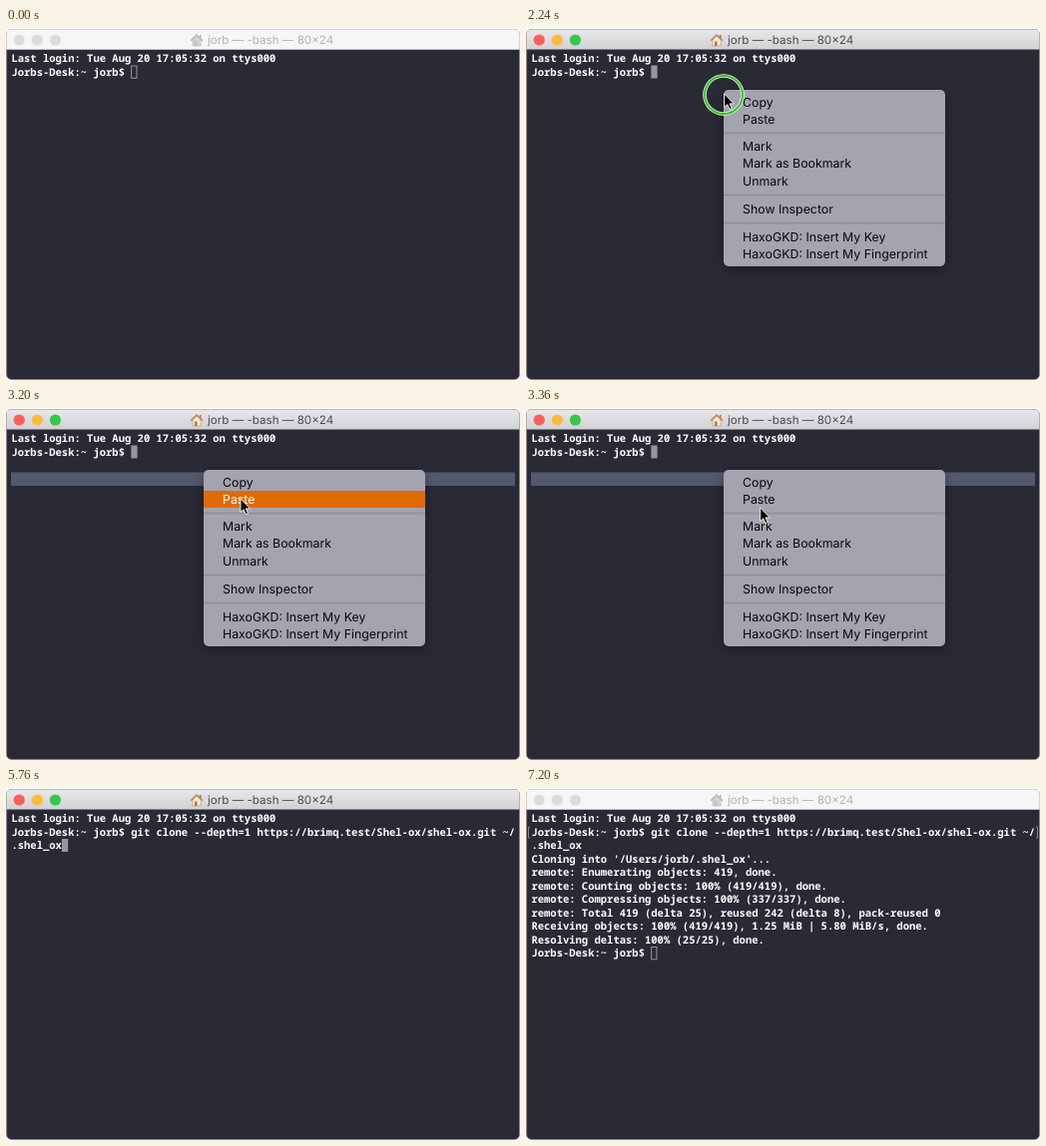
Write an HTML page that moves like this. It is 515 px wide and 353 px high and loops after 8000 ms.

```html
<!DOCTYPE html>
<html lang="en">
<head>
<meta charset="utf-8">
<title>Terminal</title>
<style>
html, body { margin: 0; width: 100%; height: 100%; overflow: hidden; background: #fff; }
svg { display: block; width: 515px; height: 353px; }
text { text-rendering: geometricPrecision; white-space: pre; }
#term text { font: 600 10.52px "Noto Sans Mono", "DejaVu Sans Mono", monospace; fill: #fff; }
.bar text { font: 11.6px Inter, "Liberation Sans", sans-serif; }
#menu text { font: 12.35px Inter, "Liberation Sans", sans-serif; fill: #08080c; }
#menu text.hot { fill: #fff; }
#menu { filter: drop-shadow(0 4px 6px rgba(0, 0, 0, .35)); }
</style>
</head>
<body>
<svg viewBox="0 0 515 353">
  <defs>
    <linearGradient id="metal" x2="0" y2="1">
      <stop stop-color="#e8e7e9"/><stop offset="1" stop-color="#d1d0d2"/>
    </linearGradient>
    <path id="caret" d="M-3-6.5H-2Q0-6.5 0-5V5Q0 6.5-2 6.5H-3M3-6.5H2Q0-6.5 0-5M3 6.5H2Q0 6.5 0 5M-1.5 2H1.5"/>
  </defs>
  <rect x=".5" y="1.5" width="514" height="351" rx="5" fill="#2a2936" stroke="#85858b" stroke-width=".8"/>
  <g id="on" class="bar"></g>
  <g id="off" class="bar"></g>
  <rect id="row" x="5" y="64.5" width="505" height="13.5" fill="#54596d"/>
  <g id="term"></g>
  <path id="marks" d="M4 39H2.5V50H4M511 39H512.5V50H511" fill="none" stroke="#85858d"/>
  <rect id="block" width="6.3" height="13" fill="#96969c"/>
  <rect id="hollow" width="5.3" height="12.3" fill="none" stroke="#96969c"/>
  <g id="menu"></g>
  <g id="ring" fill="none">
    <circle cx="198" cy="67" r="19" stroke="#e4f5e0" stroke-width="3.6"/>
    <circle cx="198" cy="67" r="19" stroke="#3cbf2c" stroke-width="2"/>
  </g>
  <path id="arrow" d="M0 0V13.5L3.1 10.8L5.3 15.6L7.5 14.6L5.3 9.9H9.6Z" fill="#000" stroke="#fff" stroke-width=".9"/>
  <g id="beam" fill="none" stroke-linecap="square">
    <use href="#caret" stroke="#fff" stroke-width="2.8"/>
    <use href="#caret" stroke="#16161c"/>
  </g>
</svg>
<script>
const $ = id => document.getElementById(id);
const show = (id, on) => $(id).style.display = on ? '' : 'none';
const LOOP = 8000, STEP = 80, CELL = 6.312, LINE = 13.5, LEFT = 5.4, TOP = 24;

// Title bar, in colour or greyed out
function bar(active) {
  const lights = ['#fc5f59', '#fdbb3c', '#33c748'].map((c, i) =>
    `<circle cx="${13.2 + i * 18.1}" cy="12" r="5.6" fill="${active ? c : '#dcdcdd'}"/>`).join('');
  const [roof, wall, door, ink] = active
    ? ['#b98a63', '#f4ead2', '#a8794f', '#4b4b4d']
    : ['#b9b9b9', '#d2d2d2', '#bdbdbd', '#b2b2b4'];
  return `<path d="M.5 21.5V7Q.5 1.5 6 1.5H509Q514.5 1.5 514.5 7V21.5Z" fill="${active ? 'url(#metal)' : '#f6f6f6'}"/>
    ${lights}
    <path d="M193.8 7H195.6V11H193.8Z" fill="${door}"/>
    <path d="M187 12L191 8L195.3 12V18H187Z" fill="${wall}" stroke="${roof}" stroke-width=".6"/>
    <path d="M189 13.5H191.5V18H189Z" fill="${door}"/>
    <path d="M185.3 12.6L191 7L196.9 12.6" fill="none" stroke="${roof}" stroke-width="1.6"/>
    <text x="202" y="16.4" fill="${ink}">jorb — -bash — 80×24</text>`;
}
$('on').innerHTML = bar(true);
$('off').innerHTML = bar(false);

const PROMPT = 'Jorbs-Desk:~ jorb$ ';
const PASTE = 3520, ENTER = 5840, DONE = 6560;

function screen(t) {
  const lines = ['Last login: Tue Aug 20 17:05:32 on ttys000', PROMPT];
  const add = (from, text) => t >= from && lines.push(text);
  if (t >= PASTE) {
    lines[1] += 'git clone --depth=1 https://brimq.test/Shel-ox/shel-ox.git ~/';
    lines.push('.shel_ox');
  }
  const got = t < 6400 ? 172 : t < 6480 ? 327 : 419;
  add(ENTER, "Cloning into '/Users/jorb/.shel_ox'...");
  add(6080, 'remote: Enumerating objects: 419, done.');
  add(6080, 'remote: Counting objects: 100% (419/419), done.');
  add(6160, 'remote: Compressing objects: 100% (337/337), done.');
  add(6160, 'remote: Total 419 (delta 25), reused 242 (delta 8), pack-reused 0');
  add(6320, `Receiving objects: ${Math.floor(100 * got / 419)}% (${got}/419)` +
    (got === 419 ? ', 1.25 MiB | 5.80 MiB/s, done.' : ''));
  add(6480, 'Resolving deltas: 100% (25/25), done.');
  add(DONE, PROMPT);
  if (t >= ENTER && t < DONE) lines.push('');
  return lines;
}

// Menu entries: label and centre; entries without a label are separators
const ITEMS = [['Copy', 74.5], ['Paste', 91.5], ['', 105.5], ['Mark', 119], ['Mark as Bookmark', 136],
  ['Unmark', 153.5], ['', 167.5], ['Show Inspector', 181.5], ['', 195.5],
  ['HaxoGKD: Insert My Key', 209.5], ['HaxoGKD: Insert My Fingerprint', 226.5]];

function menu(hot) {
  return '<rect x="198" y="62" width="222" height="177" rx="5" fill="#a4a3ae"/>' +
    ITEMS.map(([label, y], i) => !label
      ? `<rect x="198" y="${y - .8}" width="222" height="1.7" fill="#918f9c"/>`
      : (i === hot ? `<rect x="198" y="${y - 8.5}" width="222" height="17" fill="#e06a04"/>` : '') +
        `<text x="217" y="${y + 4.2}"${i === hot ? ' class="hot"' : ''}>${label}</text>`).join('');
}

// Pointer path: time, x, y
const PATH = [[720, 363, 190], [800, 348, 121], [880, 348, 121], [960, 352, 129], [1120, 292.5, 84],
  [1360, 292.5, 84], [1520, 198.7, 66], [2400, 198.7, 66], [3200, 235, 91], [3280, 234.7, 100],
  [3600, 234.7, 100], [3920, 272.7, 219]];

function pointer(t) {
  const i = PATH.findIndex(p => p[0] > t);
  if (i < 0) return PATH.at(-1).slice(1);
  const b = PATH[i], a = PATH[i - 1] || b;
  const k = a === b ? 0 : (t - a[0]) / (b[0] - a[0]);
  return [a[1] + (b[1] - a[1]) * k, a[2] + (b[2] - a[2]) * k];
}

function draw(t) {
  const fade = from => Math.min(1, Math.max(0, (t - from + STEP) / (3 * STEP)));
  $('off').setAttribute('opacity', 1 - fade(960) + fade(6960));
  const active = t >= 960 && t < 6960;

  const lines = screen(t), last = lines.length - 1;
  $('term').innerHTML = lines.map((s, i) =>
    `<text x="${LEFT}" y="${TOP + 10.4 + i * LINE}">${s}</text>`).join('');
  const cx = LEFT + lines[last].length * CELL, cy = TOP + last * LINE;
  $('block').setAttribute('transform', `translate(${cx} ${cy})`);
  $('hollow').setAttribute('transform', `translate(${cx + .3} ${cy + .5})`);
  show('block', active);
  show('hollow', !active);
  show('marks', t >= ENTER);

  const [x, y] = pointer(t);
  const open = t >= 2240 && t < PASTE, seen = t >= 720 && t < 5760;
  show('row', t >= 2320 && t < PASTE);
  show('menu', open);
  if (open) {
    const hot = t === 3360 || y <= 66 ? -1 : y < 83 ? 0 : 1;
    $('menu').innerHTML = menu(hot);
    $('menu').style.opacity = t >= 3440 ? .5 : 1;
  }
  show('ring', t >= 2160 && t < 2320);
  const arrow = open || t < 960;
  for (const id of ['arrow', 'beam']) $(id).setAttribute('transform', `translate(${x} ${y})`);
  show('arrow', seen && arrow);
  show('beam', seen && !arrow);
}

let shown = -1;
function tick() {
  const t = Math.floor(performance.now() % LOOP / STEP) * STEP;
  if (t !== shown) draw(shown = t);
  requestAnimationFrame(tick);
}
tick();
</script>
</body>
</html>
```
